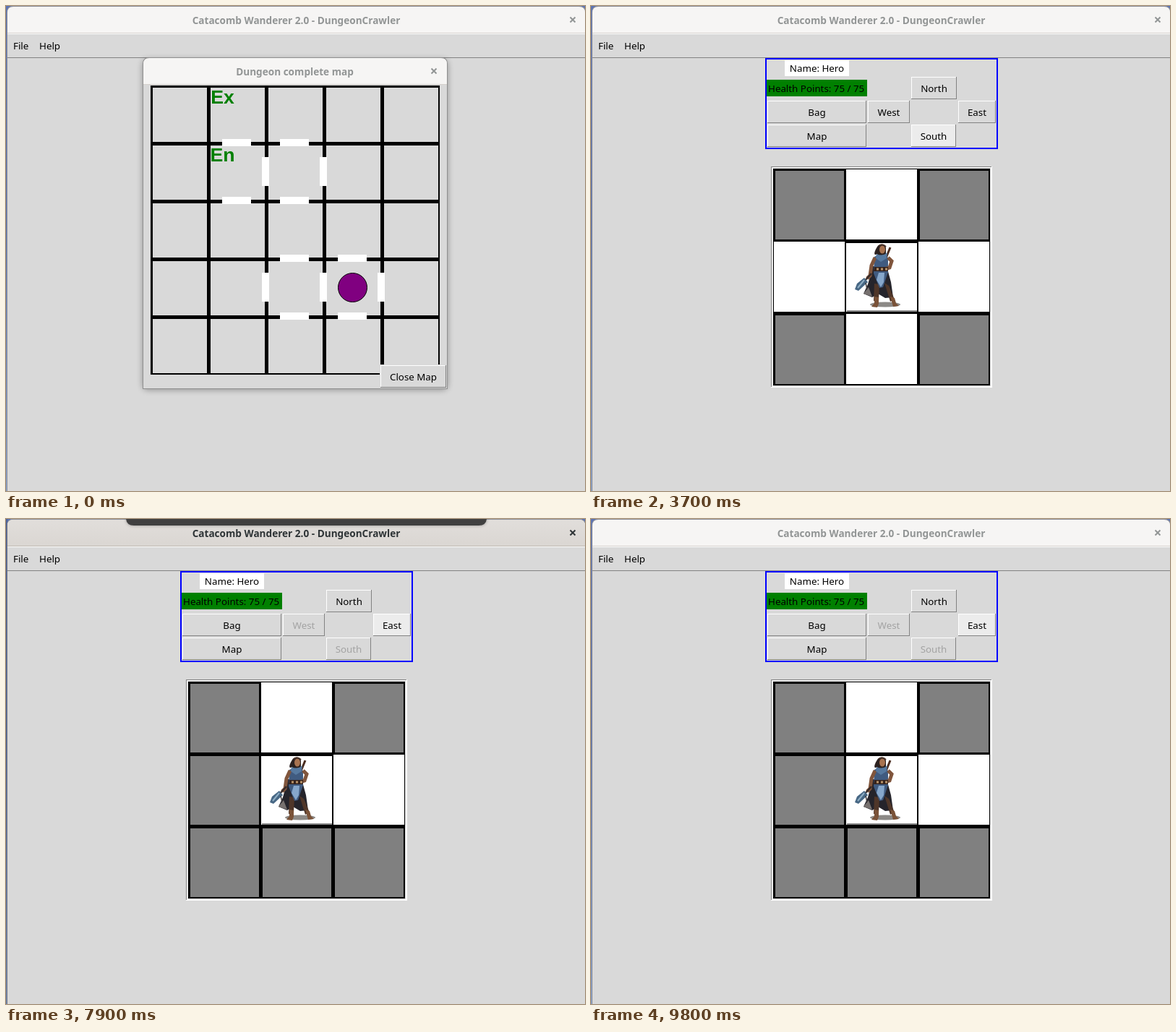
These frames come from a looping animation (801x671 px, 10000 ms). An HTML page:

```html
<!DOCTYPE html>
<html lang="en">
<head>
<meta charset="utf-8">
<title>Dungeon map</title>
<style>
html, body { margin: 0; width: 100%; height: 100%; overflow: hidden; background: #d9d9d9; }
svg { display: block; width: 801px; height: 671px; }
text { font: 500 13.33px "Noto Sans", sans-serif; white-space: pre; }
.title { font-weight: 700; font-size: 13.6px; }
.mark { font: 700 26.67px "Liberation Sans", Arial, sans-serif; fill: #008000; }
.mid { text-anchor: middle; }
.off { fill: #a3a3a3; }
.layer { animation: 10s step-end infinite; }
#focus { animation-name: focus; }
#dialog { animation-name: dialog; }
#over { animation-name: over; }
#press { animation-name: press; }
#before { animation-name: before; }
#north { animation-name: north; }
#banner { animation-name: banner; }
@keyframes focus { 0%, 84%, 98% { opacity: 0 } 53%, 92% { opacity: 1 } }
@keyframes dialog { 0% { opacity: 1 } 37%, 100% { opacity: 0 } }
@keyframes over { 0%, 35%, 100% { opacity: 0 } 22% { opacity: 1 } }
@keyframes press { 0%, 37%, 100% { opacity: 0 } 35% { opacity: 1 } }
@keyframes before { 0% { opacity: 1 } 56%, 100% { opacity: 0 } }
@keyframes north { 0%, 75%, 100% { opacity: 0 } 56% { opacity: 1 } }
@keyframes banner { 0%, 90%, 100% { opacity: 0 } 56% { opacity: .5 } 57% { opacity: 1 } }
</style>
</head>
<body>
<svg id="stage" viewBox="0 0 801 671">
  <defs>
    <linearGradient id="desk" x2="0" y2="1">
      <stop stop-color="#5b73b3"/><stop offset=".45" stop-color="#5570b0"/><stop offset="1" stop-color="#86a3d2"/>
    </linearGradient>
    <linearGradient id="bar" x2="0" y2="1">
      <stop stop-color="#e1dedb"/><stop offset="1" stop-color="#dad6d2"/>
    </linearGradient>
    <filter id="soft" x="-10%" y="-10%" width="120%" height="120%"><feGaussianBlur stdDeviation="4"/></filter>
    <filter id="near" x="-10%" y="-100%" width="120%" height="400%"><feGaussianBlur stdDeviation="2"/></filter>
    <g id="hero">
      <ellipse cx="407" cy="413" rx="21" ry="3.5" fill="#8c8986"/>
      <path d="M390 360 L383 385 L377 398 L389 403 L397 398 L407 404 L418 403 L415 382 L409 360Z" fill="#25242b"/>
      <path d="M384 389 L377 398 L389 402Z" fill="#77716f"/>
      <path d="M392 384 L399 385 L398 407 L391 408Z M406 383 L412 387 L420 406 L414 409Z" fill="#4f3629"/>
      <path d="M392 402 L398 403 L398 412 L396 417 L388 416 L392 411Z M414 402 L420 404 L422 411 L426 415 L418 416Z" fill="#7a5238"/>
      <path d="M405 356 L414 334" stroke="#4a2c20" stroke-width="3"/>
      <path d="M392 347 L400 343 L411 348 L411 368 L404 389 L399 390 L391 370Z" fill="#405b80"/>
      <path d="M398 369 L406 369 L405 382 L401 389 L395 379Z" fill="#86a7cb"/>
      <path d="M393 348 L388 359 L386 373 L382 377 M411 348 L416 353 L413 362 L406 364" fill="none" stroke="#80553c" stroke-width="5"/>
      <path d="M392 361 H411 V367 H391Z" fill="#35231d"/>
      <path d="M395 364 h3 m3 0 h3 m3 0 h3" stroke="#b89369" stroke-width="3"/>
      <path d="M388 370 L377 382" stroke="#352a29" stroke-width="2.5"/>
      <path d="M378 376 L383 382 L370 394 L365 392 L368 384Z" fill="#476784"/>
      <path d="M378 379 L369 390" stroke="#8faec5" stroke-width="2"/>
      <path d="M380 383 L382 392" stroke="#453f40" stroke-width="1.5"/>
      <path d="M396 343 C390 347 392 339 396 333 C399 328 408 329 408 335 L408 345 L398 348Z" fill="#2c211f"/>
      <ellipse cx="403" cy="337" rx="4" ry="5.5" fill="#a87350"/>
      <path d="M398 332 Q403 328 408 333" fill="none" stroke="#4b3429" stroke-width="2"/>
      <path d="M395 343 Q403 347 410 341 L409 349 L401 354 L394 349Z" fill="#56799f"/>
    </g>
  </defs>
</svg>
<script>
const rect = (x, y, x2, y2, fill, more = '') =>
  `<rect x="${x}" y="${y}" width="${x2 - x}" height="${y2 - y}" fill="${fill}" ${more}/>`;
const text = (x, y, s, cls = '', fill = '') =>
  `<text x="${x}" y="${y}" class="${cls}"${fill && ` fill="${fill}"`}>${s}</text>`;
const layer = (id, ...parts) => `<g id="${id}" class="layer">${parts.join('')}</g>`;
const group = (n, fn) => Array.from({ length: n }, (_, i) => fn(i)).join('');
const cross = (x, y, color) =>
  `<path d="M${x - 3.5} ${y - 3.5}l7 7m0 -7l-7 7" stroke="${color}" stroke-width="2"/>`;
const cap = (x, y, x2, y2, r, fill) =>
  `<path d="M${x} ${y2}V${y + r}q0 ${-r} ${r} ${-r}H${x2 - r}q${r} 0 ${r} ${r}V${y2}Z" fill="${fill}"/>`;

const FACE = '#d9d9d9', HOT = '#ececec', DARK = '#828282', PALE = '#929595', INK = '#2e3436';

function button(x, y, x2, y2, label, { face = FACE, cls = '', down = 0 } = {}) {
  const [hi, lo] = down ? [DARK, '#fff'] : ['#fff', DARK];
  return rect(x, y, x2, y2, lo) + rect(x, y, x2 - 1, y2 - 1, hi) + rect(x + 1, y + 1, x2 - 1, y2 - 1, face) +
    text((x + x2) / 2 + down, (y + y2) / 2 + 5.5 + down, label, 'mid ' + cls);
}

// Board cells: closed rooms are grey, open ones white with a thin edge
const closed = (c, r) => rect(255 + c * 100, 228 + r * 100, 350 + c * 100, 323 + r * 100, '#808080');
const open = (c, r) => rect(253 + c * 100, 226 + r * 100, 351 + c * 100, 323 + r * 100, '#fff');

const caption = 'Catacomb Wanderer 2.0 - DungeonCrawler';
const frame =
  rect(0, 0, 801, 671, 'url(#desk)') +
  cap(1, 0, 802, 671, 9, '#8d8f99') +
  cap(2, 1, 801, 38, 8, '#f6f5f4') +
  rect(2, 37, 801, 38, '#d5d0cc') +
  rect(2, 38, 801, 671, FACE) +
  rect(2, 38, 801, 39, '#fff') + rect(2, 71, 801, 72, DARK) +
  text(401.5, 25, caption, 'title mid', PALE) + cross(784, 19, PALE) +
  text(10, 60, 'File') + text(46, 60, 'Help');

const focus = layer('focus',
  rect(0, 0, 2, 671, '#25304e', 'opacity=".25"'),
  cap(2, 1, 801, 38, 8, 'url(#bar)'),
  rect(2, 37, 801, 38, '#bfb8b1'),
  text(401.5, 25, caption, 'title mid', INK), cross(784, 19, INK));

const panel =
  rect(241, 72, 563, 198, '#00f') + rect(243, 74, 561, 196, FACE) +
  rect(268, 75, 357, 97, '#fff') + text(312.5, 91, 'Name: Hero', 'mid') +
  rect(243, 102, 382, 125, '#008000') + text(245, 119, 'Health Points: 75 / 75') +
  button(443, 98, 506, 129, 'North') +
  button(244, 131, 381, 162, 'Bag') +
  button(383, 131, 441, 162, 'West', { cls: 'off' }) +
  button(508, 131, 560, 162, 'East', { face: HOT }) +
  button(244, 164, 381, 195, 'Map') +
  button(443, 164, 505, 195, 'South', { cls: 'off' });

const board =
  rect(249, 222, 555, 528, '#fff') + rect(249, 222, 554, 527, DARK) +
  rect(250, 223, 554, 527, '#fff') + rect(251, 224, 553, 526, FACE) +
  rect(252, 225, 552, 525, '#000') +
  group(9, i => closed(i % 3, i / 3 | 0)) + open(1, 0) + open(2, 1) +
  rect(353, 328, 451, 423, '#fff') + rect(354, 421, 451, 423, '#8a8a8a') + '<use href="#hero"/>';

const before = layer('before',
  open(0, 1), open(1, 2),
  button(383, 131, 441, 162, 'West'),
  button(508, 131, 560, 162, 'East'),
  button(443, 164, 505, 195, 'South', { face: HOT }));

const doorH = (x, y) => rect(x - 20, y - 5, x + 20, y + 5, '#fff');
const doorV = (x, y) => rect(x - 5, y - 20, x + 5, y + 20, '#fff');
const map =
  group(4, i => rect(278 + i * 80, 110, 283 + i * 80, 510, '#000') +
    rect(200, 188 + i * 80, 600, 193 + i * 80, '#000')) +
  rect(200, 110, 600, 113, '#000') + rect(200, 110, 203, 510, '#000') +
  rect(598, 110, 600, 510, '#000') + rect(200, 508, 600, 510, '#000') +
  [189, 269].map(y => doorH(319, y) + doorH(399, y)).join('') +
  [349, 429].map(y => doorH(399, y) + doorH(479, y)).join('') +
  doorV(359, 229) + doorV(439, 229) +
  [359, 439, 519].map(x => doorV(x, 389)).join('') +
  text(299.5, 135, 'Ex', 'mark mid') + text(299.5, 215, 'En', 'mark mid') +
  '<circle cx="479.5" cy="389.5" r="20" fill="#800080" stroke="#000"/>';

const close = [518, 497, 609, 528, 'Close Map'];
const dialog = layer('dialog',
  rect(189, 74, 611, 531, '#000', 'rx="7" opacity=".35" filter="url(#soft)"'),
  cap(189, 71, 611, 530, 9, '#8f8f8f'),
  cap(190, 72, 610, 529, 8, '#f6f5f4'),
  rect(190, 108, 610, 109, '#d5d0cc'), rect(190, 109, 610, 529, FACE),
  text(399.5, 96, 'Dungeon complete map', 'title mid', PALE), cross(592, 90, PALE),
  map, rect(517, 496, 610, 529, FACE), button(...close),
  layer('over', button(...close, { face: HOT })),
  layer('press', button(...close, { face: HOT, down: 2 })));

const tab = 'M166 0H665Q664 9 654 9H177Q167 9 166 0Z';
const banner = layer('banner',
  `<path d="${tab}" opacity=".35" filter="url(#near)"/><path d="${tab}" fill="#404040"/>`);

document.getElementById('stage').insertAdjacentHTML('beforeend',
  frame + focus + panel + board + before +
  layer('north', button(443, 98, 506, 129, 'North', { face: HOT })) + dialog + banner);
</script>
</body>
</html>
```
